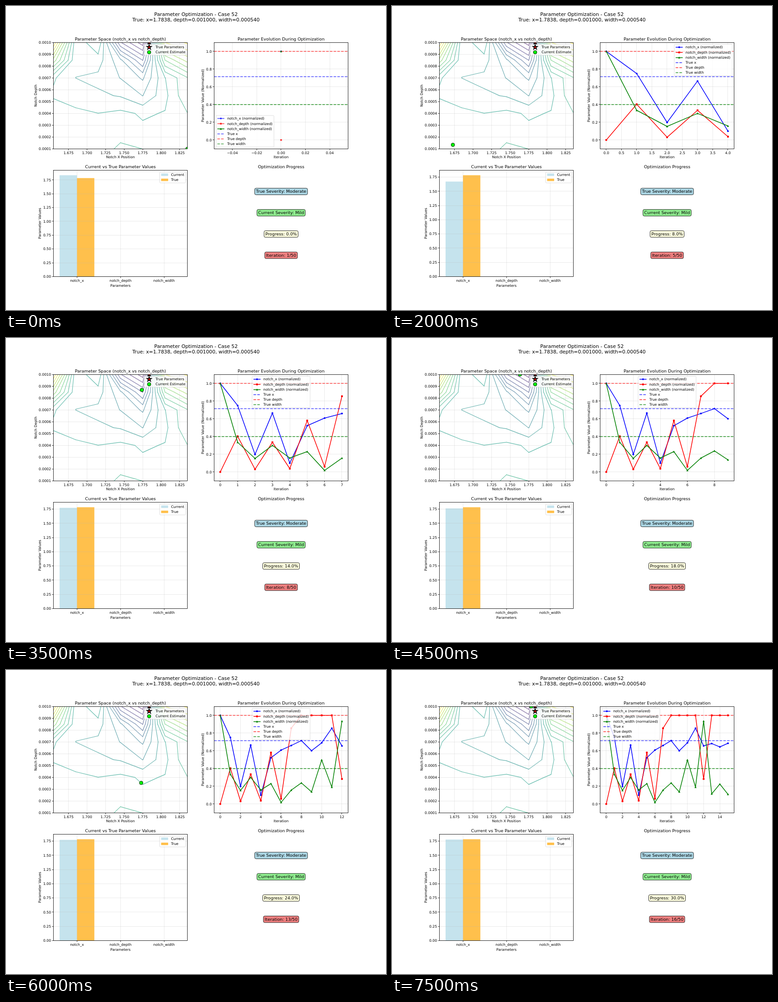
An HTML page with a canvas that plays this animation: 837 by 669 pixels, repeating every 8000 ms.

```html
<!DOCTYPE html>
<html>
<head>
<meta charset="utf-8">
<style>
html, body { margin: 0; width: 100%; height: 100%; overflow: hidden; background: #fff; }
canvas { display: block; }
</style>
</head>
<body>
<canvas id="stage" width="837" height="669"></canvas>
<script>
const ctx = document.getElementById('stage').getContext('2d');
const PT = 0.775, FONT = 10 * PT;
const W = 294.9, H = 234.1, LEFT = 104.6, RIGHT = 458.5, TOP = 80.3, LOW = 361.3;
const STEP = 500, COUNT = 16;
const X_MIN = 1.6547, X_SPAN = 0.1806, TRUE_X = 1.7838;

// Normalised parameter history, one value per iteration
const xs = [1, .75, .198, .665, .1, .522, .608, .66, .715, .601, .69, .855, .655, .682, .644, .685];
const depths = [0, .403, .031, .335, .038, .58, .06, .855, 1, 1, 1, 1, .282, 1, 1, 1];
const widths = [1, .335, .153, .3, .158, .23, .018, .157, .238, .137, .497, .19, .935, .115, .225, .11];
const series = [
  { name: 'notch_x', short: 'x', data: xs, rgb: '0,0,255', goal: .715, mark: 'circle' },
  { name: 'notch_depth', short: 'depth', data: depths, rgb: '255,0,0', goal: 1, mark: 'square' },
  { name: 'notch_width', short: 'width', data: widths, rgb: '0,128,0', goal: .4, mark: 'triangle' }
];

// Error surface in contour steps: rows run from the greatest depth down
const field = [
  [9, -.85, .98, -6.9, -9.6, 7, 8.2],
  [4.6, -.9, -.52, -2.75, -6.03, 3, 5.4],
  [.14, -1.005, -1.25, -2.03, -3.15, -.03, 1.9],
  [-.19, -.6, -.835, -1.075, -2.02, -.28, 1.86],
  [.95, .28, .01, .235, -.125, .056, .97],
  [.8, .5, .4, .7, .19, .5, .8],
  [.7, .6, .6, 1.16, .995, .7, .8]
];
const viridis = [[68, 1, 84], [70, 50, 126], [54, 92, 141], [39, 127, 142],
  [31, 161, 135], [74, 193, 109], [160, 218, 57], [253, 231, 37]];

const snap = v => Math.floor(v) + .5;

function text(str, x, y, align = 'center', pt = 10) {
  const size = pt * PT;
  ctx.font = size + 'px "DejaVu Sans", sans-serif';
  ctx.textAlign = align;
  ctx.fillStyle = '#000';
  ctx.fillText(str, x, y + size * .36);
}

function textWidth(str, pt = 10) {
  ctx.font = pt * PT + 'px "DejaVu Sans", sans-serif';
  return ctx.measureText(str).width;
}

function vertical(str, x, y) {
  ctx.save();
  ctx.translate(x, y);
  ctx.rotate(-Math.PI / 2);
  text(str, 0, 0);
  ctx.restore();
}

function polyline(points, color, width, dash = []) {
  ctx.beginPath();
  points.forEach(p => ctx.lineTo(...p));
  ctx.strokeStyle = color;
  ctx.lineWidth = width;
  ctx.setLineDash(dash);
  ctx.stroke();
  ctx.setLineDash([]);
}

function shape(fill, stroke, width) {
  ctx.fillStyle = fill;
  ctx.fill();
  ctx.strokeStyle = stroke;
  ctx.lineWidth = width;
  ctx.stroke();
}

function clipped(x, y, draw) {
  ctx.save();
  ctx.beginPath();
  ctx.rect(x, y, W, H);
  ctx.clip();
  draw();
  ctx.restore();
}

function grid(x, y, xTicks, yTicks) {
  const color = 'rgba(176,176,176,.3)';
  xTicks.forEach(([p]) => polyline([[snap(p), y], [snap(p), y + H]], color, .9));
  yTicks.forEach(([p]) => polyline([[x, snap(p)], [x + W, snap(p)]], color, .9));
}

function frame(x, y, xTicks, yTicks, labelDrop = 8.7) {
  const left = snap(x), base = snap(y + H);
  ctx.strokeStyle = '#000';
  ctx.lineWidth = .85;
  ctx.strokeRect(left, snap(y), snap(x + W) - left, base - snap(y));
  for (const [p, label] of xTicks) {
    polyline([[snap(p), base], [snap(p), base + 3]], '#000', .8);
    text(label, p, base + labelDrop);
  }
  for (const [p, label] of yTicks) {
    polyline([[left, snap(p)], [left - 3, snap(p)]], '#000', .8);
    text(label, x - 5.4, p, 'right');
  }
}

function legendBox(x, y, w, h) {
  ctx.beginPath();
  ctx.roundRect(x, y, w, h, 1.6);
  shape('rgba(255,255,255,.8)', 'rgba(204,204,204,.8)', .8);
}

function marker(kind, x, y, color) {
  const r = 1.95;
  ctx.beginPath();
  if (kind === 'circle') ctx.arc(x, y, r, 0, 7);
  else if (kind === 'square') ctx.rect(x - r, y - r, 2 * r, 2 * r);
  else {
    ctx.moveTo(x, y - r - .4);
    ctx.lineTo(x + r + .4, y + r);
    ctx.lineTo(x - r - .4, y + r);
  }
  ctx.fillStyle = color;
  ctx.fill();
}

function star(x, y) {
  ctx.beginPath();
  for (let i = 0; i < 10; i++) {
    const r = i % 2 ? 2.09 : 5.48, a = i * Math.PI / 5;
    ctx.lineTo(x + r * Math.sin(a), y - r * Math.cos(a));
  }
  ctx.closePath();
  shape('#f00', '#000', 1.55);
}

function dot(x, y) {
  ctx.beginPath();
  ctx.arc(x, y, 3.9, 0, 7);
  shape('#0f0', '#000', .9);
}

function levelColor(level) {
  const t = Math.min(1, Math.max(0, (level + 10) / 18)) * 7;
  const i = Math.min(6, Math.floor(t));
  const mix = viridis[i].map((c, j) => c + (viridis[i + 1][j] - c) * (t - i));
  return `rgb(${mix.map(c => Math.round(255 + (c - 255) * .7))})`;
}

// Marching squares over the coarse surface
function contours() {
  ctx.lineCap = 'round';
  for (let level = -10; level <= 9; level++) {
    const color = levelColor(level);
    for (let r = 0; r < 6; r++) for (let c = 0; c < 6; c++) {
      const corners = [[c, r], [c + 1, r], [c + 1, r + 1], [c, r + 1]];
      const v = corners.map(([i, j]) => field[j][i] - level);
      const hits = [];
      corners.forEach(([i, j], n) => {
        const m = (n + 1) % 4, [i2, j2] = corners[m];
        if (v[n] > 0 === v[m] > 0) return;
        const f = v[n] / (v[n] - v[m]);
        hits.push([LEFT + W / 6 * (i + (i2 - i) * f), TOP + H / 6 * (j + (j2 - j) * f)]);
      });
      if (hits.length === 4 && v[0] > 0 !== v[0] + v[1] + v[2] + v[3] > 0) hits.unshift(hits.pop());
      for (let n = 0; n < hits.length; n += 2) polyline(hits.slice(n, n + 2), color, 1.16);
    }
  }
  ctx.lineCap = 'butt';
}

function drawSpace(k) {
  const xTicks = [], yTicks = [];
  for (let v = 1.675; v < 1.83; v += .025) xTicks.push([LEFT + W * (v - X_MIN) / X_SPAN, v.toFixed(3)]);
  for (let i = 1; i <= 10; i++) yTicks.push([TOP + H * (10 - i) / 9, (i / 1e4).toFixed(4)]);
  clipped(LEFT, TOP, () => {
    grid(LEFT, TOP, xTicks, yTicks);
    contours();
    star(LEFT + W * .715, TOP);
    dot(LEFT + W * xs[k], TOP + H * (1 - depths[k]));
  });
  frame(LEFT, TOP, xTicks, yTicks);
  const w = 24.8 + 3.1 + textWidth('True Parameters'), x = LEFT + W - 3.9 - w;
  legendBox(x, 84.3, w, 24);
  star(x + 10.85, 90.8);
  dot(x + 10.85, 101.8);
  text('True Parameters', x + 24.8, 90.5, 'left');
  text('Current Estimate', x + 24.8, 101.5, 'left');
  text('Parameter Space (notch_x vs notch_depth)', LEFT + W / 2, 73, 'center', 12);
  text('Notch X Position', LEFT + W / 2, 332.7);
  vertical('Notch Depth', 65, TOP + H / 2);
}

function crosses([x1, y1], [x2, y2], b) {
  let t0 = 0, t1 = 1;
  for (const [p, d, lo, hi] of [[x1, x2 - x1, b.x, b.x + b.w], [y1, y2 - y1, b.y, b.y + b.h]]) {
    if (!d) {
      if (p < lo || p > hi) return false;
      continue;
    }
    const a = (lo - p) / d, c = (hi - p) / d;
    t0 = Math.max(t0, Math.min(a, c));
    t1 = Math.min(t1, Math.max(a, c));
  }
  return t0 <= t1;
}

// Picks the legend corner that hides the fewest points and lines
function bestSpot(lines, w, h) {
  const at = (fx, fy) => ({
    x: RIGHT + 3.9 + fx * (W - 7.8 - w), y: TOP + 3.9 + fy * (H - 7.8 - h), w, h
  });
  const spots = [at(1, 0), at(0, 0), at(0, 1), at(1, 1), at(1, .5), at(0, .5), at(.5, 1), at(.5, 0), at(.5, .5)];
  const cost = b => lines.reduce((sum, line) => sum
    + line.filter(([x, y]) => x > b.x && x < b.x + w && y > b.y && y < b.y + h).length
    + line.some((p, i) => i && crosses(line[i - 1], p, b)), 0);
  return spots.reduce((best, s) => cost(s) < cost(best) ? s : best);
}

function iterationTicks(k, px) {
  const lo = k ? -k * .05 : -.055, hi = k ? k * 1.05 : .055;
  const step = [.02, .2, .25, .5, 1, 2].find(s => s >= (hi - lo) / 9);
  const digits = step === .02 || step === .25 ? 2 : step < 1 ? 1 : 0;
  const ticks = [];
  for (let i = Math.ceil(lo / step); i * step <= hi; i++)
    ticks.push([px(i * step), (i * step).toFixed(digits).replace(/^-(?=0\.0*[1-9])/, '\u2212').replace('-', '')]);
  return ticks;
}

function drawEvolution(k) {
  const px = i => RIGHT + W * (k ? (i / k + .05) / 1.1 : (i + .055) / .11);
  const py = v => TOP + H * (1.1 - v) / 1.2;
  const xTicks = iterationTicks(k, px);
  const yTicks = [0, .2, .4, .6, .8, 1].map(v => [py(v), v.toFixed(1)]);
  const color = (s, solid) => `rgba(${s.rgb},${solid ? 1 : .7})`;
  const solid = s => k > 0 || s.short === 'width';
  const dash = [5.74, 2.48];
  const paths = series.map(s => s.data.slice(0, k + 1).map((v, i) => [px(i), py(v)]));
  const goals = series.map(s => [[RIGHT, py(s.goal)], [RIGHT + W, py(s.goal)]]);

  clipped(RIGHT, TOP, () => {
    grid(RIGHT, TOP, xTicks, yTicks);
    ctx.lineJoin = 'round';
    series.forEach((s, i) => {
      polyline(paths[i], color(s, solid(s)), 1.55);
      paths[i].forEach(p => marker(s.mark, ...p, color(s, solid(s))));
    });
    series.forEach((s, i) => polyline(goals[i], color(s), 1.55, dash));
    ctx.lineJoin = 'miter';
  });
  frame(RIGHT, TOP, xTicks, yTicks);

  const w = 27.9 + textWidth('notch_depth (normalized)');
  const box = bestSpot([...paths, ...goals], w, 69.5);
  const rows = [6.5, 18, 29.4, 40.4, 51.4, 62.4];
  legendBox(box.x, box.y, w, 69.5);
  series.forEach((s, i) => {
    const x = box.x + 3.1, y1 = box.y + rows[i], y2 = box.y + rows[i + 3];
    polyline([[x, y1], [x + 15.5, y1]], color(s, solid(s)), 1.55);
    marker(s.mark, x + 7.75, y1, color(s, solid(s)));
    polyline([[x, y2], [x + 15.5, y2]], color(s), 1.55, dash);
    text(s.name + ' (normalized)', x + 21.7, y1, 'left');
    text('True ' + s.short, x + 21.7, y2, 'left');
  });
  text('Parameter Evolution During Optimization', RIGHT + W / 2, 73, 'center', 12);
  text('Iteration', RIGHT + W / 2, 332.7);
  vertical('Parameter Value (Normalized)', 433.7, TOP + H / 2);
}

function drawBars(k) {
  const now = X_MIN + X_SPAN * xs[k];
  const py = v => LOW + H * (1 - v / (1.05 * Math.max(now, TRUE_X)));
  const xTicks = series.map((s, i) => [156.3 + 95.9 * i, s.name]);
  const yTicks = [];
  for (let v = 0; v < 1.8; v += .25) yTicks.push([py(v), v.toFixed(2)]);
  const bars = [['Current', 'rgba(173,216,230,.7)', now], ['True', 'rgba(255,165,0,.7)', TRUE_X]];
  bars.forEach(([, color, v], i) => {
    ctx.fillStyle = color;
    ctx.fillRect(118 + 38.3 * i, py(v), 38.3, py(0) - py(v));
  });
  grid(LEFT, LOW, xTicks, yTicks);
  frame(LEFT, LOW, xTicks, yTicks, 9);
  const w = 27.9 + textWidth('Current'), x = LEFT + W - 3.9 - w;
  legendBox(x, 365.3, w, 24);
  bars.forEach(([name, color], i) => {
    const y = 371.3 + 11.3 * i;
    ctx.fillStyle = color;
    ctx.fillRect(x + 3.1, y - 2.7, 15.5, 5.4);
    text(name, x + 24.8, y, 'left');
  });
  text('Current vs True Parameter Values', LEFT + W / 2, 354, 'center', 12);
  text('Parameters', LEFT + W / 2, 615);
  vertical('Parameter Values', 74, LOW + H / 2);
}

function drawProgress(k) {
  const mid = RIGHT + W / 2;
  text('Optimization Progress', mid, 354, 'center', 12);
  [
    ['True Severity: Moderate', '#add8e6'],
    ['Current Severity: Mild', '#90ee90'],
    [`Progress: ${(k * 2).toFixed(1)}%`, '#ffffe0'],
    [`Iteration: ${k + 1}/50`, '#f08080']
  ].forEach(([label, color], i) => {
    const y = 408.1 + 46.8 * i, w = textWidth(label, 12) + 5.6;
    ctx.beginPath();
    ctx.roundRect(mid - w / 2, y - 7.1, w, 14.4, 2.8);
    shape(color, '#000', .85);
    text(label, mid, y - .2, 'center', 12);
  });
}

function draw() {
  const k = Math.floor(performance.now() / STEP) % COUNT;
  ctx.fillStyle = '#fff';
  ctx.fillRect(0, 0, 837, 669);
  text('Parameter Optimization - Case 52', 418.5, 18, 'center', 14);
  text('True: x=1.7838, depth=0.001000, width=0.000540', 418.5, 30.4, 'center', 14);
  drawSpace(k);
  drawEvolution(k);
  drawBars(k);
  drawProgress(k);
  requestAnimationFrame(draw);
}
draw();
</script>
</body>
</html>
```
